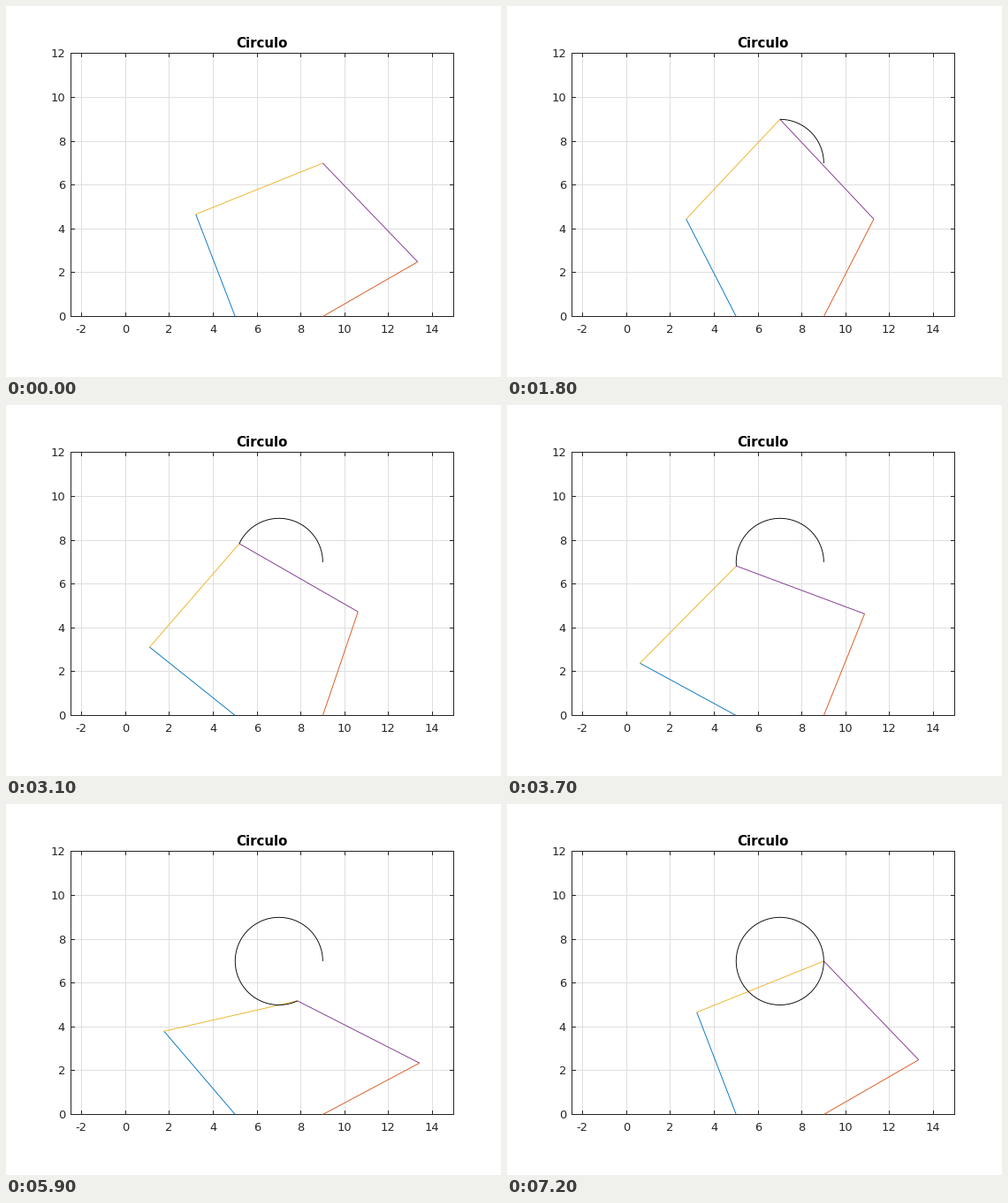
A matplotlib script for the animation above (7.3 s loop, 560x420 px).

```python
import numpy as np
import matplotlib.pyplot as plt
from matplotlib.animation import FuncAnimation

W, H, DPI = 560, 420, 100
PT = 72 / DPI                      # points per pixel
FRAMES, INTERVAL = 73, 100
LEFT, RIGHT, TOP, BOTTOM = 73.5, 506.5, 53.5, 351.5
INK, GRID = "#262626", "#dfdfdf"
THIN = 0.9 * PT

# Five-bar linkage: two fixed pivots and a pen that follows a circle
PIVOT_L, PIVOT_R = np.array([5.0, 0.0]), np.array([9.0, 0.0])
CENTER, RADIUS = np.array([7.0, 7.0]), 2.0
LOWER, UPPER = 5.0, 6.25

plt.rcParams["font.family"] = "DejaVu Sans"
fig = plt.figure(figsize=(W / DPI, H / DPI), dpi=DPI, facecolor="white")
ax = fig.add_axes([0, 0, 1, 1])
ax.set_xlim(0, W)
ax.set_ylim(H, 0)
ax.axis("off")


def to_px(points):
    x, y = np.asarray(points, float).T
    return 135.35 + 24.78 * x, BOTTOM - 24.8 * y


def pixel_center(v):
    return np.floor(v) + 0.5


def rule(xs, ys, color, z):
    ax.plot(xs, ys, color=color, lw=PT, zorder=z, snap=False,
            solid_capstyle="butt")


def label(x, y, text, size, **kw):
    ax.text(x, y, text, fontsize=size * PT, va="baseline", **kw)


def draw_axes():
    tick = 4.5
    for v in range(-2, 15, 2):
        x = pixel_center(to_px([(v, 0)])[0][0])
        rule([x, x], [TOP, BOTTOM], GRID, 1)
        rule([x, x], [BOTTOM, BOTTOM - tick], INK, 2)
        rule([x, x], [TOP, TOP + tick], INK, 2)
        label(x - 0.3, 370.5, str(v), 13, ha="center", color=INK)
    for v in range(0, 13, 2):
        y = pixel_center(to_px([(0, v)])[1][0])
        rule([LEFT, RIGHT], [y, y], GRID, 1)
        rule([LEFT, LEFT + tick], [y, y], INK, 2)
        rule([RIGHT, RIGHT - tick], [y, y], INK, 2)
        label(67, y + 4.7, str(v), 13, ha="right", color=INK)
    for y in (TOP, BOTTOM):
        rule([LEFT - 0.5, RIGHT + 0.5], [y, y], INK, 2)
    for x in (LEFT, RIGHT):
        rule([x, x], [TOP, BOTTOM], INK, 2)
    label(289.8, 47, "Circulo", 15, ha="center",
          color="black", weight="bold")


def pen(step):
    t = np.radians(5 * np.asarray(step))
    return CENTER + RADIUS * np.stack([np.cos(t), np.sin(t)], axis=-1)


def elbow(pivot, tip, side):
    """Joint between pivot and tip; side is +1 for left, -1 for right."""
    d = tip - pivot
    dist = np.hypot(*d)
    along = (dist**2 + LOWER**2 - UPPER**2) / (2 * dist)
    off = np.sqrt(LOWER**2 - along**2)
    u = d / dist
    return pivot + along * u + side * off * np.array([-u[1], u[0]])


draw_axes()
links = [ax.plot([], [], color=c, lw=THIN, zorder=3,
                 solid_capstyle="butt")[0]
         for c in ("#0072bd", "#d95319", "#edb120", "#7e2f8e")]
trail, = ax.plot([], [], color="black", lw=THIN, zorder=4,
                 solid_capstyle="butt")


def update(i):
    tip = pen(i)
    left, right = elbow(PIVOT_L, tip, 1), elbow(PIVOT_R, tip, -1)
    ends = [(PIVOT_L, left), (PIVOT_R, right), (left, tip), (right, tip)]
    for line, pair in zip(links, ends):
        line.set_data(*to_px(pair))
    trail.set_data(*to_px(pen(np.arange(i + 1))))
    return [*links, trail]


anim = FuncAnimation(fig, update, frames=FRAMES, interval=INTERVAL,
                     repeat=True, repeat_delay=0)
plt.show()
```
